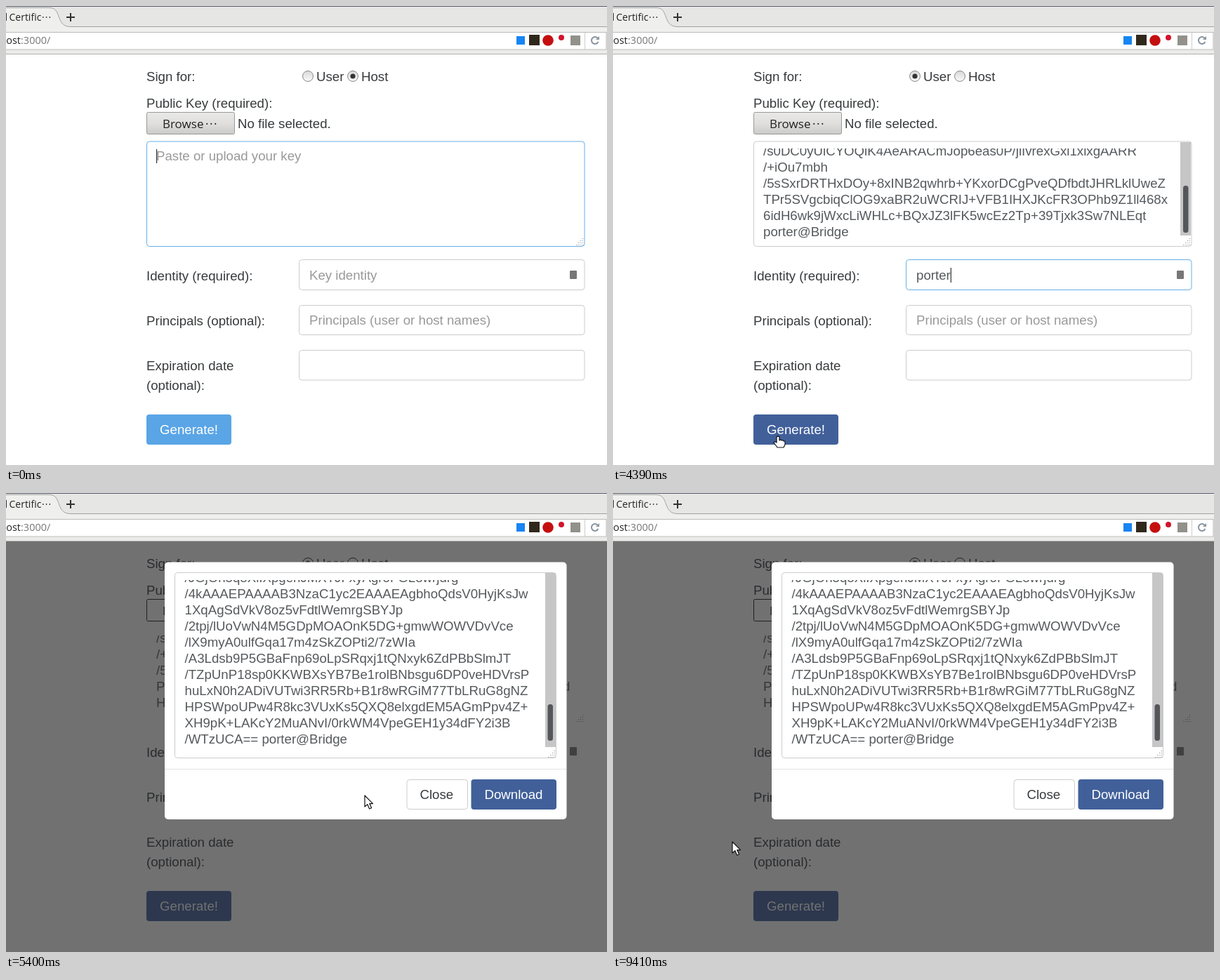
These frames come from a looping animation (856x654 px, 9.65 s). An HTML page:

```html
<!DOCTYPE html>
<html lang="en">
<head>
<meta charset="utf-8">
<title>Certificate form</title>
<style>
html, body { margin: 0; width: 100%; height: 100%; overflow: hidden; background: #fff; }
svg { display: block; width: 856px; height: 654px; }
text { font: 18.667px "Liberation Sans", Arial, sans-serif; fill: #373a3c; white-space: pre; }
.ui { font: 13.7px "Open Sans", "Noto Sans", sans-serif; fill: #222; }
.end { text-anchor: end; }
.mid { text-anchor: middle; }
.hint { fill: #999; }
.value { fill: #55595c; }
.box { fill: #fff; stroke: #ccc; }
.focus { stroke: #66afe9; }
.browse { fill: url(#grey); stroke: #999; }
.primary { fill: #41609a; }
.primary.off { fill: #5aa5e6; }
.primary.hover { fill: #3d5b94; }
.primary.down { fill: #38548a; }
.label { fill: #fff; }
.track { fill: #c6c6c6; }
.thumb { fill: #55565a; }
.grip { stroke: #888; stroke-dasharray: 1 1.6; fill: none; }
.dim .box { stroke: none; }
.dim .browse { fill: #fff; stroke: #1c1c1c; }
.dim .radio { fill: #fff; stroke: #222; }
.radio { fill: url(#knob); stroke: #8a8a8a; }
.pointer { fill: #fff; stroke: #111; stroke-width: 1.2; stroke-linejoin: round; }
</style>
</head>
<body>
<svg viewBox="0 0 856 654">
  <defs>
    <linearGradient id="grey" x2="0" y2="1">
      <stop offset="0" stop-color="#e9e9e8"/><stop offset=".5" stop-color="#e0dfde"/><stop offset="1" stop-color="#cbcbca"/>
    </linearGradient>
    <linearGradient id="button" x2="0" y2="1">
      <stop offset="0" stop-color="#f1f1f0"/><stop offset="1" stop-color="#d9d9d8"/>
    </linearGradient>
    <linearGradient id="knob" x2="0" y2="1">
      <stop offset="0" stop-color="#d8d8d8"/><stop offset="1" stop-color="#fafafa"/>
    </linearGradient>
    <clipPath id="page"><rect y="69" width="856" height="585"/></clipPath>
    <clipPath id="keyClip"><rect id="keyWindow" x="201" y="203" width="622" height="130"/></clipPath>
    <clipPath id="certClip"><rect x="241" y="124" width="527" height="240"/></clipPath>
    <path id="grip" class="grip" d="M0 10.5H11M3 7.5H11M6 4.5H11M9 1.5H11"/>
  </defs>

  <g clip-path="url(#page)">
    <g id="form">
      <rect y="69" width="856" height="585" fill="#fff"/>
      <text x="200" y="107">Sign for:</text>
      <circle class="radio" cx="430" cy="100" r="7.5"/>
      <circle class="radio" cx="494" cy="100" r="7.5"/>
      <circle id="choice" cy="100" r="3.6" fill="#333"/>
      <text x="442" y="107">User</text>
      <text x="506" y="107">Host</text>
      <text x="200" y="145">Public Key (required):</text>
      <rect class="browse" x="200.5" y="151.5" width="125" height="31" rx="2"/>
      <text class="ui" x="223" y="174" style="font-size:17px">Browse</text>
      <text class="ui" x="284" y="174" style="font-size:17px;letter-spacing:1.5px">···</text>
      <text x="330" y="174">No file selected.</text>

      <rect id="keyBox" class="box" x="200.5" y="193" width="623.5" height="149.5" rx="4"/>
      <text id="keyHint" class="hint" x="214" y="220">Paste or upload your key</text>
      <g clip-path="url(#keyClip)">
        <g id="keyNarrow"></g>
        <g id="keyWide"></g>
      </g>
      <g id="keyScroll">
        <rect class="track" x="808" y="194" width="15" height="133"/>
        <rect class="thumb" x="812" y="256" width="7.5" height="67" rx="3.5"/>
      </g>
      <rect id="keyCaret" x="214" width="1.2" height="20" fill="#333"/>

      <g id="lower">
        <use href="#grip" x="812" y="330"/>
        <text x="200" y="391">Identity (required):</text>
        <rect id="nameBox" class="box" x="417.5" y="361.5" width="406.5" height="43" rx="4"/>
        <text id="nameHint" class="hint" x="432" y="390">Key identity</text>
        <text id="name" class="value" x="432" y="390"></text>
        <rect id="nameCaret" y="373" width="1.2" height="21" fill="#333"/>
        <rect x="803" y="377" width="10" height="12" rx="1" fill="#777"/>
        <text x="200" y="455">Principals (optional):</text>
        <rect class="box" x="417.5" y="426.5" width="406.5" height="42" rx="4"/>
        <text class="hint" x="432" y="454">Principals (user or host names)</text>
        <text x="200" y="519">Expiration date</text>
        <text x="200" y="547">(optional):</text>
        <rect class="box" x="417.5" y="490.5" width="406.5" height="42.5" rx="4"/>
        <rect id="generate" class="primary" x="200" y="582" width="121" height="43" rx="4"/>
        <text class="label" x="219" y="610">Generate!</text>
      </g>
    </g>

    <rect id="backdrop" y="69" width="856" height="585" fill="#232325"/>

    <g id="modal">
      <rect x="226" y="98.5" width="572.5" height="366.5" rx="5" fill="#fff"/>
      <rect class="box" x="240.5" y="113.5" width="543" height="264" rx="4"/>
      <rect class="track" x="768" y="114" width="15" height="248"/>
      <rect class="thumb" x="771.5" y="301" width="7.5" height="52" rx="3.5"/>
      <use href="#grip" x="772" y="366"/>
      <g id="cert" clip-path="url(#certClip)"></g>
      <path d="M226 393.5H798" stroke="#e3e3e3"/>
      <rect class="box" x="571" y="408.5" width="86.5" height="42" rx="4"/>
      <text x="589.5" y="436">Close</text>
      <rect id="download" class="primary" x="662.5" y="408" width="121.5" height="43" rx="4"/>
      <text class="label" x="681.5" y="436">Download</text>
    </g>
  </g>

  <g id="browser">
    <rect width="856" height="69" fill="#ebebea"/>
    <rect width="856" height="29" fill="#e6e6e5"/>
    <path d="M-1 2.5H62C80 2.5 70 29.5 92 29.5H856V37H-1Z" fill="#efefee"/>
    <path d="M-1 2.5H62C80 2.5 70 29.5 92 29.5H856" fill="none" stroke="#a3a3a3"/>
    <rect id="topLine" width="856" height="1"/>
    <rect y="10" width="1" height="11" fill="#333"/>
    <text class="ui" x="4.5" y="21" style="font-size:14px">Certific</text>
    <text class="ui" x="51" y="21" style="font-size:14px;letter-spacing:1px">···</text>
    <path d="M86 16H98M92 10V22" stroke="#333" stroke-width="2"/>
    <rect x="-1" y="37.5" width="856" height="24.5" fill="#fff" stroke="#bcbcbc"/>
    <text class="ui end" x="21" y="54" style="font-size:14.5px">host</text>
    <text class="ui" x="21" y="54" style="font-size:14.5px;fill:#777">:3000/</text>
    <rect x="727" y="43" width="12" height="12" fill="#1785f2"/>
    <rect x="745" y="41" width="15" height="15" fill="#30281a"/>
    <circle cx="772" cy="49" r="7.8" fill="#c50f0f"/>
    <circle cx="791" cy="45" r="4" fill="#d2142c"/>
    <rect x="804" y="42" width="14" height="14" fill="#92928a"/>
    <path d="M824.5 38V62" stroke="#ccc"/>
    <path d="M843 46A5 5 0 1 0 843.5 51" fill="none" stroke="#8b95a0" stroke-width="2"/>
    <path d="M840 48H845V43Z" fill="#8b95a0"/>
    <rect y="68" width="856" height="1" fill="#b0b0b0"/>
  </g>

  <g id="dialog">
    <rect x="-2" y="210.5" width="339.5" height="314" fill="#e8e8e7" stroke="#3a3a3c"/>
    <text class="ui end" x="34" y="234">open:</text>
    <text class="ui end" x="2.5" y="262">o</text>
    <text class="ui end" x="142.5" y="289">text document (1.4 KB)</text>
    <text class="ui end" x="124.5" y="342" style="font-weight:700">x do with this file?</text>
    <rect x="-4" y="356.5" width="308" height="29" rx="2" fill="url(#button)" stroke="#a5a5a5"/>
    <text class="ui" x="2.5" y="376">Ondle (default)</text>
    <path d="M283.5 368.5L288 373L292.5 368.5" fill="none" stroke="#222" stroke-width="1.8"/>
    <path d="M0 392.5H304M0 410.5H304" stroke="#aaa" stroke-dasharray="1 1"/>
    <text class="ui end" x="248.5" y="440">automatically for files like this from now on.</text>
    <rect id="cancel" x="136.5" y="487.5" width="88" height="26" rx="2" fill="url(#button)" stroke="#a0a0a0"/>
    <rect x="234.5" y="487.5" width="88" height="26" rx="2" fill="url(#button)" stroke="#a0a0a0"/>
    <text class="ui mid" x="180.5" y="505">Cancel</text>
    <text class="ui mid" x="278.5" y="505">OK</text>
  </g>

  <g id="cursor">
    <path id="arrow" class="pointer" d="M0 0V16L3.8 12.6L6.6 19L9.6 17.8L6.8 11.6H11.5Z"/>
    <g id="beam" fill="none">
      <path d="M-3.5 -7H3.5M0 -7V7M-3.5 7H3.5" stroke="#111" stroke-width="3.2"/>
      <path d="M-2.5 -7H2.5M0 -7V7M-2.5 7H2.5" stroke="#fff"/>
    </g>
    <path id="hand" class="pointer" d="M-2 1Q0 -1 2 1V6Q4 4 5 6Q7 5 8 7Q10 6 10 9V12L8 16H-1L-6 9Q-5 7 -2 9Z"/>
  </g>
</svg>
<script>
const LOOP = 9650;
const el = {};
document.querySelectorAll('[id]').forEach(node => el[node.id] = node);

const owner = 'porter';
const address = owner + '@Bridge';

function addLines(group, x, y, lines) {
  lines.forEach((line, i) => {
    const text = document.createElementNS('http://www.w3.org/2000/svg', 'text');
    text.setAttribute('x', x);
    text.setAttribute('y', y + 23 * i);
    text.setAttribute('class', 'value');
    text.textContent = line;
    group.append(text);
  });
}

const keyTop = ['/s0DC0yUlCYOQlK4AeARACmJop6eas0P/jlIvrexGxl1xlxgAARR', '/+iOu7mbh'];
addLines(el.keyNarrow, 214, 213, [...keyTop,
  '/5sSxrDRTHxDOy+8xINB2qwhrb+YKxorDCgPveQDfbdtJHRLklUweZ',
  'TPr5SVgcbiqClOG9xaBR2uWCRIJ+VFB1IHXJKcFR3OPhb9Z1ll468x',
  '6idH6wk9jWxcLiWHLc+BQxJZ3lFK5wcEz2Tp+39Tjxk3Sw7NLEqt', address]);
addLines(el.keyWide, 214, 213, [...keyTop,
  '/5sSxrDRTHxDOy+8xINB2qwhrb+YKxorDCgPveQDfbdtJHRLklUweZT',
  'Pr5SVgcbiqClOG9xaBR2uWCRIJ+VFB1IHXJKcFR3OPhb9Z1ll468x6id',
  'H6wk9jWxcLiWHLc+BQxJZ3lFK5wcEz2Tp+39Tjxk3Sw7NLEqt', address]);
addLines(el.cert, 254.5, 127, [
  '/JGjOn5q8XlIXpgenJMXTJFxyAgroFGL8wrjdrg',
  '/4kAAAEPAAAAB3NzaC1yc2EAAAEAgbhoQdsV0HyjKsJw',
  '1XqAgSdVkV8oz5vFdtlWemrgSBYJp',
  '/2tpj/lUoVwN4M5GDpMOAOnK5DG+gmwWOWVDvVce',
  '/lX9myA0ulfGqa17m4zSkZOPti2/7zWIa',
  '/A3Ldsb9P5GBaFnp69oLpSRqxj1tQNxyk6ZdPBbSlmJT',
  '/TZpUnP18sp0KKWBXsYB7Be1rolBNbsgu6DP0veHDVrsP',
  'huLxN0h2ADiVUTwi3RR5Rb+B1r8wRGiM77TbLRuG8gNZ',
  'HPSWpoUPw4R8kc3VUxKs5QXQ8elxgdEM5AGmPpv4Z+',
  'XH9pK+LAKcY2MuANvI/0rkWM4VpeGEH1y34dFY2i3B',
  '/WTzUCA== ' + address]);

// time, x, y
const path = [
  [70, 760, 514], [150, 685, 328], [420, 685, 328], [1000, 442, 60], [1240, 428, 98],
  [1400, 428, 98], [1720, 370, 261], [3990, 370, 261], [4390, 235, 613], [4900, 234, 613],
  [5170, 508, 432], [5380, 508, 432], [5400, 511, 431], [6050, 777, 302], [6370, 777, 302],
  [6850, 742, 428], [7270, 742, 428], [7490, 423, 398], [7700, 423, 398], [7730, 420, 399],
  [7890, 123, 515], [8100, 123, 515], [8460, 170, 497]
];
const shapes = [
  [0, ''], [70, 'beam'], [720, 'arrow'], [1500, 'beam'], [2210, ''], [3990, 'beam'],
  [4200, 'arrow'], [4330, 'hand'], [4720, 'arrow'], [5620, 'beam'], [5980, 'arrow'],
  [6600, 'hand'], [7290, 'arrow']
];
const typing = [3220, 3300, 3390, 3470, 3610, 3760];

const within = (t, from, to) => t >= from && t < to;
const ramp = (t, from, to) => Math.min(1, Math.max(0, (t - from) / (to - from)));
const smooth = p => p * p * (3 - 2 * p);
const show = (node, on) => node.style.display = on ? '' : 'none';

function pointAt(t) {
  const next = path.findIndex(key => key[0] > t);
  if (next === 0) return path[0].slice(1);
  if (next < 0) return path[path.length - 1].slice(1);
  const [t0, x0, y0] = path[next - 1], [t1, x1, y1] = path[next];
  const p = smooth(ramp(t, t0, t1));
  return [x0 + (x1 - x0) * p, y0 + (y1 - y0) * p];
}

function drawCursor(t) {
  const shape = shapes.filter(entry => entry[0] <= t).pop()[1];
  ['arrow', 'beam', 'hand'].forEach(id => show(el[id], id === shape));
  el.cursor.setAttribute('transform', `translate(${pointAt(t)})`);
}

function drawForm(t) {
  const pasted = t >= 2210, sent = t >= 4720;
  const typed = typing.filter(time => time <= t).length;
  el.choice.setAttribute('cx', t < 1400 ? 494 : 430);

  const keyFocus = t < 1400 || within(t, 1890, 2780);
  el.keyBox.classList.toggle('focus', keyFocus);
  el.keyBox.setAttribute('height', sent ? 134.5 : 149.5);
  el.keyWindow.setAttribute('height', sent ? 115 : 130);
  show(el.keyHint, !pasted);
  show(el.keyNarrow, pasted && !sent);
  show(el.keyScroll, pasted && !sent);
  show(el.keyWide, sent);
  show(el.keyCaret, keyFocus && !within(t, 500, 1000));
  el.keyCaret.setAttribute('x', pasted ? 335 : 214);
  el.keyCaret.setAttribute('y', pasted ? 311 : 204);

  const nameFocus = within(t, 2780, 4550);
  el.nameBox.classList.toggle('focus', nameFocus);
  show(el.nameHint, !typed);
  el.name.textContent = owner.slice(0, typed);
  show(el.nameCaret, nameFocus);
  el.nameCaret.setAttribute('x', 432 + (typed ? el.name.getComputedTextLength() : 0));

  el.generate.classList.toggle('off', !typed);
  el.generate.classList.toggle('down', within(t, 4550, 4640));
  el.lower.setAttribute('transform', `translate(0 ${sent ? -15 : 0})`);
  el.form.classList.toggle('dim', sent);
}

function drawOverlays(t) {
  el.backdrop.setAttribute('opacity', 0.645 * ramp(t, 4720, 4865));

  const rise = (1 - ramp(t, 4890, 5170)) ** 2;
  show(el.modal, t >= 4920);
  el.modal.setAttribute('opacity', ramp(t, 4890, 5040));
  el.modal.setAttribute('transform', `translate(0 ${-92 * rise})`);
  el.download.classList.toggle('hover', within(t, 6600, 7270));
  el.download.classList.toggle('down', within(t, 6850, 7010));

  const open = within(t, 7270, 8990);
  show(el.dialog, open);
  el.dialog.setAttribute('opacity', ramp(t, 7230, 7490) * (1 - ramp(t, 8810, 8990)));
  el.cancel.style.stroke = t >= 8200 ? '#858585' : '';
  el.topLine.setAttribute('fill', open ? '#000' : '#555b69');
}

let start;
function frame(now) {
  start ??= now;
  const t = (now - start) % LOOP;
  drawForm(t);
  drawOverlays(t);
  drawCursor(t);
  requestAnimationFrame(frame);
}
requestAnimationFrame(frame);
</script>
</body>
</html>
```
